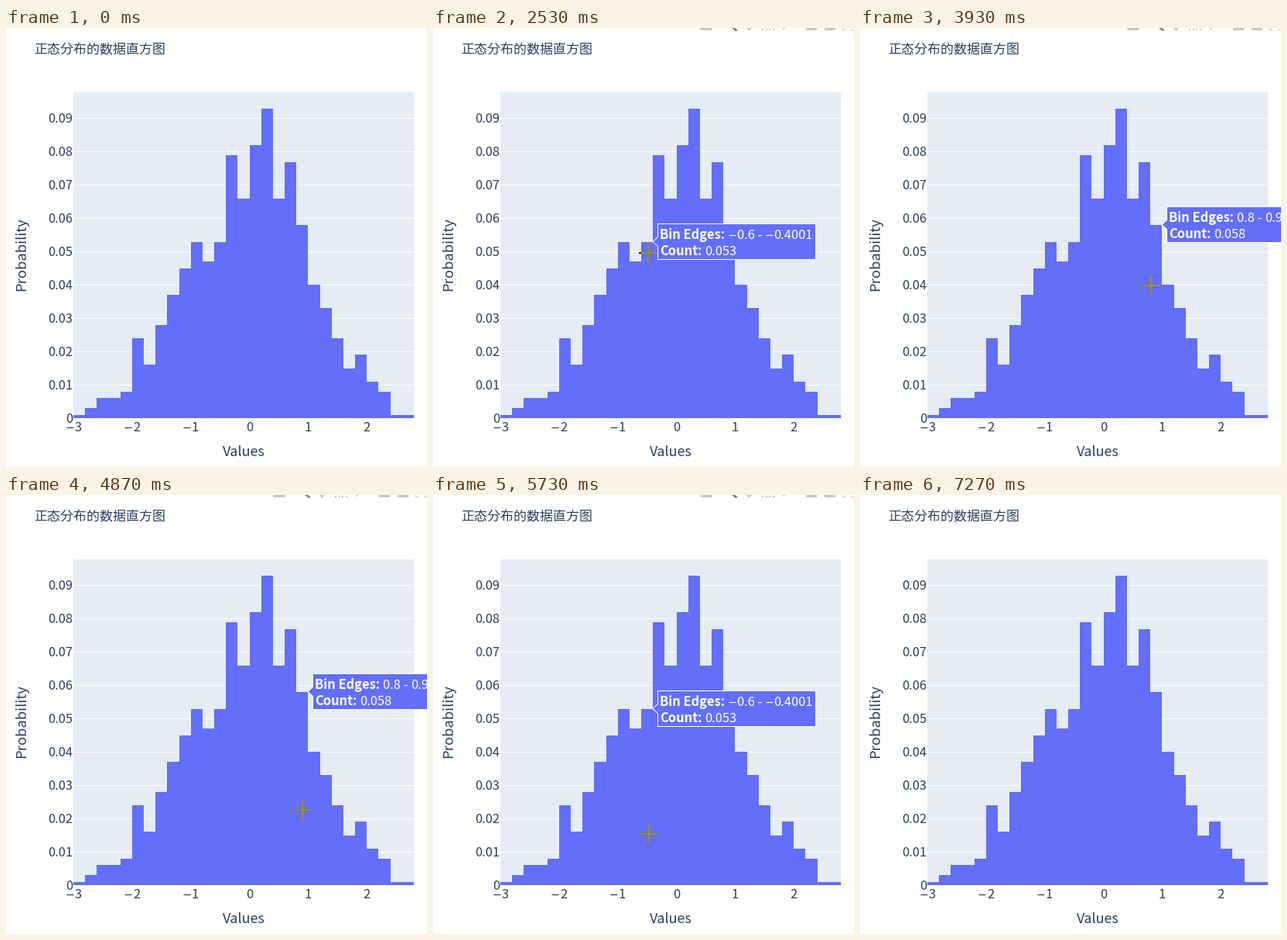
Write a matplotlib script that moves like this. It is 544x566 px and loops after 7390 ms.

```python
import matplotlib.pyplot as plt
import numpy as np
from matplotlib.animation import FuncAnimation
from matplotlib.patches import Polygon, Rectangle

W, H, DPI = 544, 566, 100
LOOP, TICK = 7390, 10
STEP = 1000 / 15                      # the pointer moves 15 times a second

LEFT, RIGHT, TOP, BASE = 87, 527, 83, 503
BLUE, PANEL, INK = "#636EFA", "#E5ECF6", "#2A3F5F"
FONT, SIZE = "Noto Sans CJK JP", 16.5
MINUS = 11.6                          # advance of a minus sign
ADVANCE = {".": 0.278, " ": 0.224, "-": 0.347}

counts = np.array([1, 3, 6, 6, 8, 24, 16, 28, 37, 45, 53, 47, 53, 79, 66,
                   82, 93, 66, 77, 58, 40, 33, 24, 15, 19, 11, 8, 1, 1])
edges = np.round(np.linspace(LEFT, RIGHT, len(counts) + 1))
unit = (BASE - TOP) * 0.95 / counts.max()
tops = np.round(BASE - unit * counts)

# pointer path: time, x, y
path = np.array([
    (1670, -10, 306), (2330, 268, 290), (2530, 278, 290), (3130, 338, 274),
    (3400, 347, 270), (3930, 376, 332), (4730, 380, 395), (4870, 383, 406),
    (5530, 293, 436), (5730, 280, 437), (6330, 174, 456), (6600, 161, 460),
    (6870, 161, 460), (7130, -10, 455)])

fig = plt.figure(figsize=(W / DPI, H / DPI), dpi=DPI, facecolor="white")
ax = fig.add_axes([0, 0, 1, 1])
ax.set_xlim(0, W)
ax.set_ylim(H, 0)
ax.axis("off")


def write(x, y, s, size=SIZE, color=INK, **kw):
    return ax.text(x, y, s, family=FONT, fontsize=size * 72 / DPI, color=color,
                   va="baseline", **kw)


def box(x, y, w, h, color, z=1):
    return ax.add_patch(Rectangle((x, y), w, h, fc=color, lw=0, zorder=z,
                                  antialiased=False))


def shape(points, color, z=1):
    return ax.add_patch(Polygon(points, closed=True, fc=color, lw=0, zorder=z))


def stroke(color, width, z):
    return ax.plot([], [], color=color, lw=width * 72 / DPI, zorder=z,
                   solid_capstyle="butt")[0]


def minus_at(line, x, y):
    line.set_data([x + 1, x + 10], [y - 5.5, y - 5.5])


def advance(s):
    return SIZE * sum(ADVANCE.get(c, 0.555) for c in s)


# chart
box(LEFT, TOP, RIGHT - LEFT, BASE - TOP, PANEL)
for k in range(10):
    y = np.floor(BASE - 10 * unit * k)
    if k:
        box(LEFT, y, RIGHT - LEFT, 1, "white")
    write(86, y + 6, f"{k / 100:g}", ha="right")

xs = np.repeat(edges, 2)[1:-1]
ys = np.repeat(tops, 2)
skyline = [(LEFT, BASE), *zip(xs, ys), (RIGHT, BASE)]
bars = ax.add_patch(Polygon(skyline, closed=True, fc=BLUE, lw=0, zorder=2,
                            antialiased=False))

for v in range(-3, 3):
    x = LEFT + (v + 3) * (RIGHT - LEFT) / 5.8
    if v < 0:
        minus_at(stroke(INK, 1.2, 3), x - 10.4, 520)
        x += MINUS / 2
    write(x, 520, str(abs(v)), ha="center")

write(36, 33, "正态分布的数据直方图", 17)
write(307.5, 552, "Values", 18, ha="center")
write(25, 291.5, "Probability", 18.4, ha="center", rotation=90,
      rotation_mode="anchor")

# toolbar, cut off by the top edge
PALE, DARK = "#C7C7C7", "#7C7C7C"
tools = [shape([(345, 0), (361, 0), (360, 3), (346, 3)], PALE),
         shape([(386, 0), (390, 0), (394, 3), (391, 4)], DARK),
         shape([(405, 0), (412, 0), (408.5, 4)], PALE),
         shape([(452, 0), (455, 0), (453, 3)], PALE)]
tools += [box(x, 1, 2, 2, PALE) for x in (425, 430, 434, 439)]
tools += [box(x, 0, 14, 3, PALE) for x in (482, 506)]
tools += [box(529, 0, 1, 3, PALE), box(529, 2, 4, 1, PALE),
          box(540, 2, 4, 1, PALE)]

border = box(1, 0, 1, H, "#D9D9D9")

# hover label
frame = ax.add_patch(Polygon([(0, 0), (1, 0), (1, 1)], closed=True, fc=BLUE,
                             ec="white", lw=72 / DPI, zorder=5))
head = write(0, 0, "Bin Edges:", color="white", weight="bold", zorder=6)
foot = write(0, 0, "Count:", color="white", weight="bold", zorder=6)
low, high, amount = (write(0, 0, "", color="white", zorder=6)
                     for _ in range(3))
signs = [stroke("white", 1.2, 6) for _ in range(2)]
label = [frame, head, foot, low, high, amount, *signs]

# the pointer inverts whatever lies below it
cross = [stroke("#1A1309", 2, 7), stroke("#9C9105", 2, 8)]
cross[1].set_clip_path(bars)


def place(text, x, y, s):
    text.set_position((x, y))
    text.set_text(s)


def show_label(i):
    x, y = edges[i + 1], tops[i] - 0.5
    start = round(-3 + 0.2 * i, 1)
    ends = start, round(start + 0.1999, 4)
    words = f"{abs(ends[0]):g} - ", f"{abs(ends[1]):g}"
    line1, line2 = y - 3.5, y + 17.5

    place(head, x + 9, line1, "Bin Edges:")
    place(foot, x + 9, line2, "Count:")
    place(amount, x + 67, line2, f"{counts[i] / 1000:g}")
    pen = x + 97
    for text, sign, value, word in zip((low, high), signs, ends, words):
        sign.set_visible(value < 0)
        if value < 0:
            minus_at(sign, pen, line1)
            pen += MINUS
        place(text, pen, line1, word)
        pen += advance(word)

    l, r = x + 6.5, np.round(pen + 3) + 0.5
    frame.set_xy([(x, y), (l, y + 6), (l, y + 23), (r, y + 23),
                  (r, y - 23), (l, y - 23), (l, y - 6)])


def update(n):
    t = np.floor((n * TICK + 5) / STEP) * STEP
    x, y = (np.round(np.interp(t, path[:, 0], path[:, k])) for k in (1, 2))
    inside = LEFT < x < RIGHT and TOP < y < BASE

    for line in cross:
        line.set_visible(inside)
        line.set_data([x - 12, x + 12, np.nan, x, x],
                      [y, y, np.nan, y - 12, y + 12])

    i = int(np.clip(np.searchsorted(edges, x + 1, "right") - 1,
                    0, len(counts) - 1))
    hover = inside and y > tops[i]
    for artist in label:
        artist.set_visible(hover)
    if hover:
        show_label(i)

    fade = np.clip((t - 1700) / 300, 0, 1)
    fade *= 1 - 0.95 * np.clip((t - 6930) / 330, 0, 1)
    for tool in tools:
        tool.set_alpha(fade)
    border.set_visible(1595 < t < 1660 or 7120 < t < 7260)
    return []


anim = FuncAnimation(fig, update, frames=LOOP // TICK, interval=TICK,
                     init_func=lambda: [], repeat=True, repeat_delay=0)
plt.show()
```
